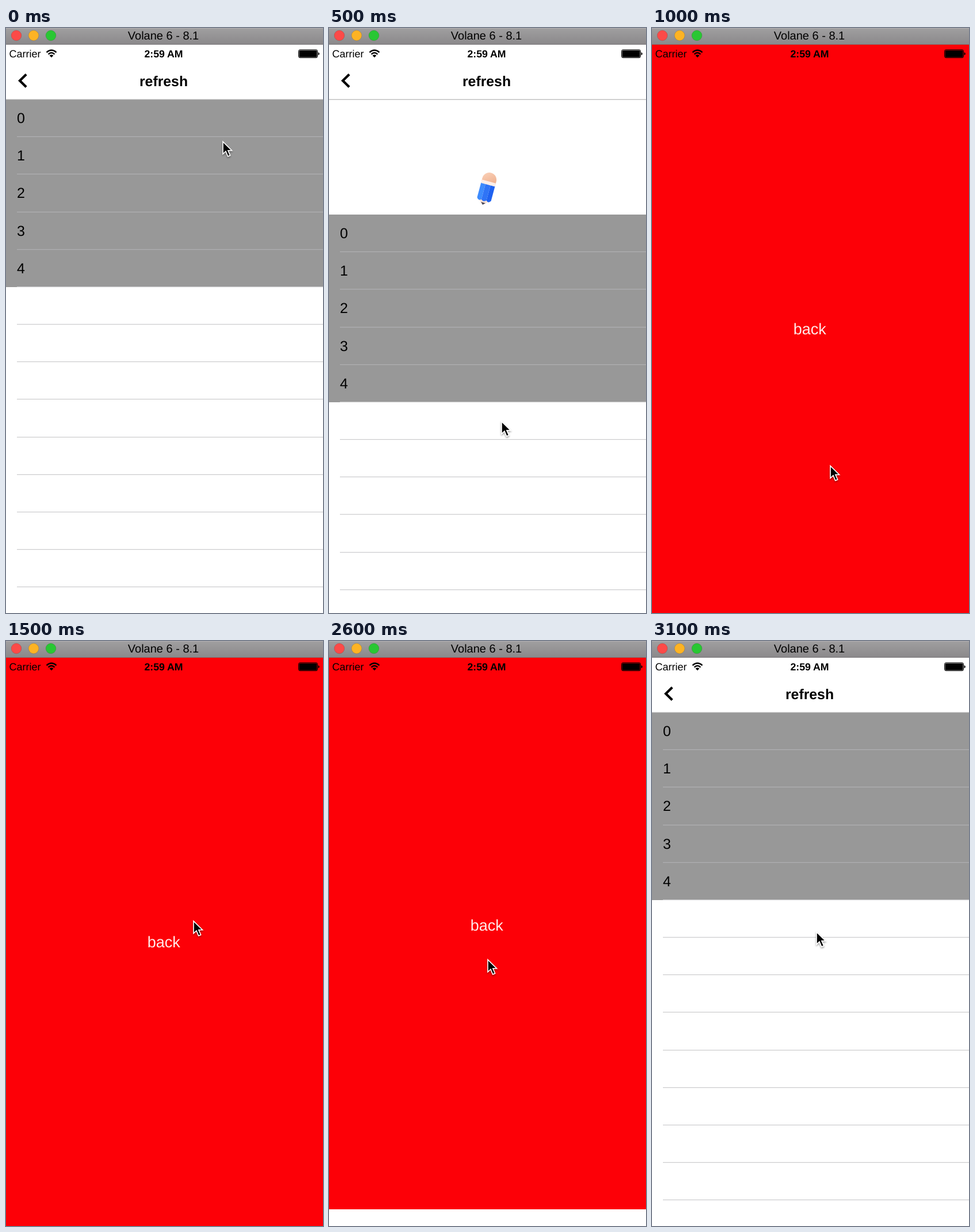
These frames come from a looping animation (551x1016 px, 3.2 s). An HTML page:

```html
<!DOCTYPE html>
<html lang="en">
<head>
<meta charset="utf-8">
<title>Pull to refresh</title>
<style>
  html, body { margin: 0; width: 100%; height: 100%; overflow: hidden; background: #fff; }
  svg { display: block; width: 551px; height: 1016px; }
  text { font-family: "Liberation Sans", Arial, sans-serif; text-rendering: geometricPrecision; }
  .mid { text-anchor: middle; }
  .bold { font-weight: bold; }
</style>
</head>
<body>
<svg viewBox="0 0 551 1016">
  <defs>
    <linearGradient id="chrome" x2="0" y2="1">
      <stop offset="0" stop-color="#a09fa0"/>
      <stop offset="1" stop-color="#8a888a"/>
    </linearGradient>
    <linearGradient id="rubber" x2="1" y2="1">
      <stop offset="0" stop-color="#fbd3bb"/>
      <stop offset="1" stop-color="#eeae8c"/>
    </linearGradient>
    <filter id="shadow" x="-60%" y="-40%" width="220%" height="200%">
      <feDropShadow dx="0" dy="2" stdDeviation="1.5" flood-opacity=".4"/>
    </filter>
  </defs>

  <rect width="551" height="1016" fill="#fff"/>

  <g id="pager">
    <g id="table">
      <g transform="translate(274.5 79) rotate(15)">
        <path d="M-12.5-10V-16A12.5 12.5 0 0 1 12.5-16V-10Z" fill="url(#rubber)"/>
        <path d="M-12.5 17L-3 27H3L12.5 17Z" fill="#fbe3d6"/>
        <path d="M-4 25L0 29L4 25Z" fill="#4b4a59"/>
        <path d="M-12.5-8H-4.5V20Q-8.5 25-12.5 19Z" fill="#3d8bfd"/>
        <path d="M-4.5-8H4.5V20Q0 25-4.5 20Z" fill="#2f74f6"/>
        <path d="M4.5-8H12.5V19Q8.5 25 4.5 20Z" fill="#1f62f0"/>
        <rect x="-12.5" y="-13" width="25" height="6" fill="#fdeee8"/>
      </g>
      <rect y="124" width="551" height="326" fill="#989898"/>
    </g>
    <rect y="29" width="551" height="95" fill="#fff"/>
    <rect y="123.6" width="551" height="1.2" fill="#b4b4b4"/>
    <path d="M35.2 80.5L24 91.5L35.2 102.5" fill="none" stroke="#000" stroke-width="4.2"/>
    <text class="mid bold" x="274" y="101" font-size="24.8">refresh</text>

    <rect y="-958" width="551" height="987" fill="#fd0007"/>
    <text class="mid" x="274.3" y="-455" font-size="27" fill="#ffe9e9">back</text>
  </g>

  <g id="status">
    <text x="5.5" y="51" font-size="18">Carrier</text>
    <g fill="none" stroke="#000" stroke-width="2.4">
      <path d="M70.5 42.3Q79 34.6 87.5 42.3"/>
      <path d="M73.6 45.6Q79 40.6 84.4 45.6"/>
    </g>
    <path d="M75.6 47.8Q79 45 82.4 47.8L79 51.3Z"/>
    <text class="mid bold" x="274" y="51" font-size="17.7">2:59 AM</text>
    <rect x="508.5" y="37.7" width="33" height="14" rx="2.5" fill="none" stroke="#000"/>
    <rect x="509.5" y="38.7" width="31" height="12" rx="1.5"/>
    <path d="M542.6 42.2Q544.8 42.6 544.8 44.7T542.6 47.2Z"/>
  </g>

  <g id="titlebar">
    <rect width="551" height="29" fill="url(#chrome)"/>
    <rect width="551" height="1" fill="#b2b0b2"/>
    <rect y="28" width="551" height="1" fill="#7a787a"/>
    <g id="buttons"></g>
    <text class="mid" x="273.5" y="20.3" font-size="20">Volane 6 - 8.1</text>
  </g>

  <path id="cursor" d="M0 .5V21.8L5 17.2L8.7 26L12.6 24.3L8.9 15.8H15.5Z"
        stroke="#fff" stroke-width="1.6" filter="url(#shadow)"/>
</svg>
<script>
const LOOP = 3200, STEP = 100, ROW = 65.17, TABLE_TOP = 124;
const PAGE = 987, SLIDE = 270, OPEN = 732.4, CLOSE = 2572.3;
const RELEASE = 700, SNAP = 300, MAX_PULL = 268;
const $ = id => document.getElementById(id);

function add(parent, name, attrs, text = '') {
  const el = document.createElementNS('http://www.w3.org/2000/svg', name);
  for (const key in attrs) el.setAttribute(key, attrs[key]);
  el.textContent = text;
  $(parent).append(el);
}

['#fc4a48', '#fdb324', '#29c733'].forEach((fill, i) =>
  add('buttons', 'circle', { cx: 18 + 30 * i, cy: 13, r: 8.9, fill, stroke: '#0002' }));

for (let row = 0; row < 14; row++) {
  const top = TABLE_TOP + row * ROW;
  if (row < 5) add('table', 'text', { x: 19, y: top + 41, 'font-size': 25 }, row);
  add('table', 'rect', {
    x: 19, y: Math.round(top + ROW) - 1, width: 532, height: 1.2,
    fill: row < 4 ? '#b0b0b2' : '#cbcbcd'
  });
}

// Turning points of the pointer's path.
const path = [
  { t: 0, x: 377, y: 197 },
  { t: 500, x: 300, y: 683 },
  { t: 800, x: 304, y: 828 },
  { t: 1500, x: 326, y: 486 },
  { t: 2350, x: 275, y: 634 },
  { t: 2600, x: 276, y: 553 },
  { t: 2800, x: 286, y: 505 }
];

const progress = (t, from, length) => Math.min(1, Math.max(0, (t - from) / length));
const easeInOut = k => k * k * (3 - 2 * k);

// Smooth curve through the path that never overshoots a point.
function pointer(axis, t) {
  const secant = i => (path[i + 1][axis] - path[i][axis]) / (path[i + 1].t - path[i].t);
  const slope = i => {
    if (i === 0 || i === path.length - 1) return 0;
    const a = secant(i - 1), b = secant(i);
    return a * b > 0 ? 2 * a * b / (a + b) : 0;
  };
  const next = path.findIndex(p => p.t > t);
  if (next < 0) return path[path.length - 1][axis];
  const i = next - 1, a = path[i], b = path[next];
  const span = b.t - a.t, k = (t - a.t) / span;
  return a[axis] + (b[axis] - a[axis]) * easeInOut(k)
    + span * k * (1 - k) * (slope(i) * (1 - k) - slope(next) * k);
}

function pull(t, y) {
  // The list follows the drag at half speed until it is let go.
  if (t < RELEASE) return Math.max(0, (y - 283) / 2);
  return MAX_PULL * (1 - progress(t, RELEASE, SNAP)) ** 2;
}

const move = (id, x, y) =>
  $(id).setAttribute('transform', `translate(${Math.round(x)} ${Math.round(y)})`);

function draw(t) {
  const x = pointer('x', t), y = pointer('y', t);
  const shown = easeInOut(progress(t, OPEN, SLIDE)) - easeInOut(progress(t, CLOSE, SLIDE));
  move('table', 0, pull(t, y));
  move('pager', 0, PAGE * shown);
  move('cursor', x, y);
}

let start;
function tick(now) {
  start ??= now;
  draw(Math.floor((now - start) % LOOP / STEP) * STEP);
  requestAnimationFrame(tick);
}
draw(0);
requestAnimationFrame(tick);
</script>
</body>
</html>
```
